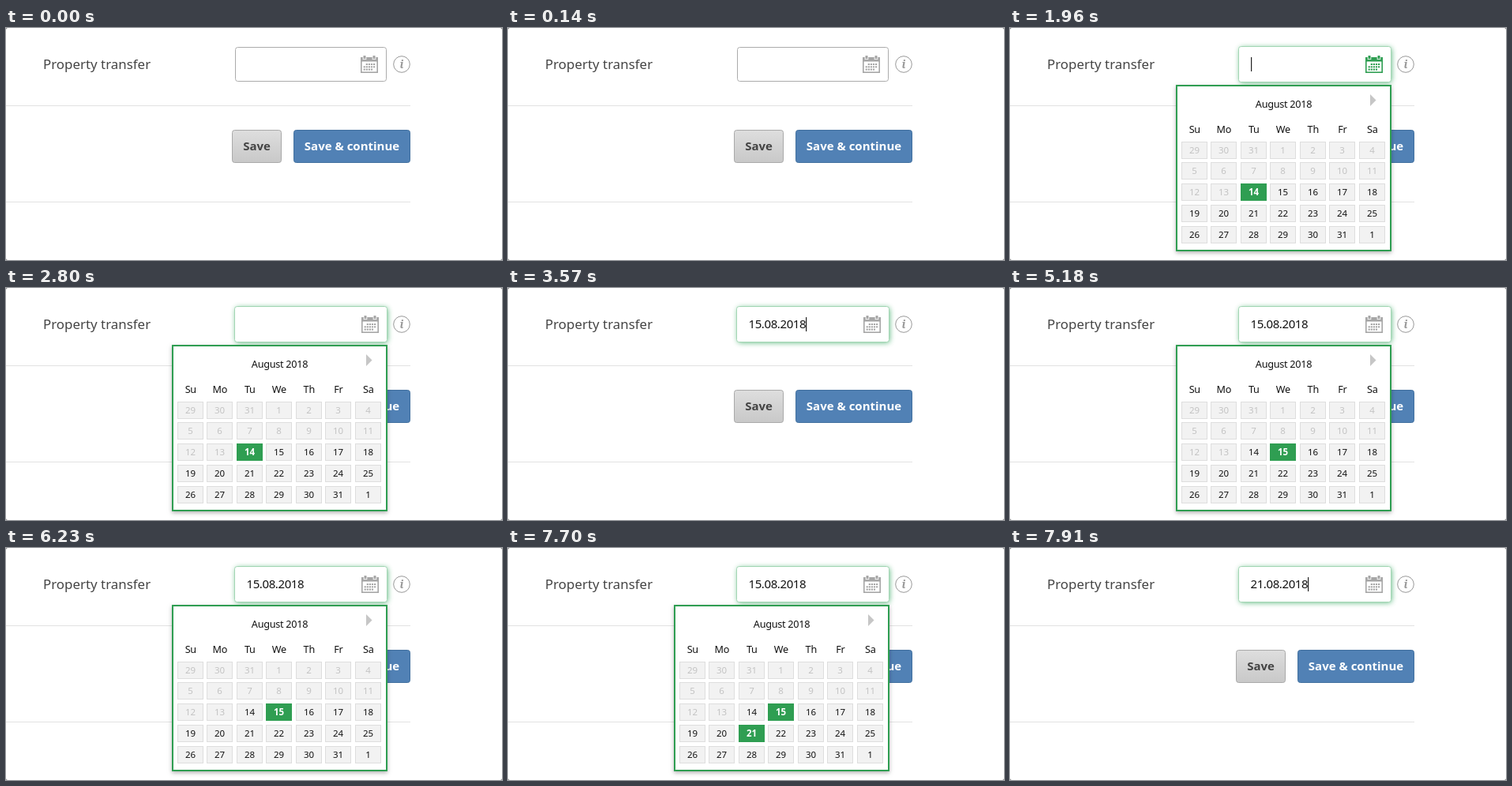
Animation of 628 by 294 pixels, one loop 8 s. Source, as an HTML page with a canvas:

```html
<!DOCTYPE html>
<html lang="en">
<head>
<meta charset="utf-8">
<title>Date picker</title>
<style>
  html, body { margin: 0; width: 100%; height: 100%; overflow: hidden; background: #fff; }
  canvas { display: block; width: 628px; height: 294px; }
</style>
</head>
<body>
<canvas id="stage"></canvas>
<script>
const W = 628, H = 294, LOOP = 8000;
const GREEN = '#2f9e52', GREY = '#a6a6a6';
const SANS = '"Noto Sans", "Open Sans", sans-serif';
const WEEKDAYS = ['Su', 'Mo', 'Tu', 'We', 'Th', 'Fr', 'Sa'];

const canvas = document.getElementById('stage');
const ctx = canvas.getContext('2d');
const ratio = window.devicePixelRatio || 1;
canvas.width = W * ratio;
canvas.height = H * ratio;

// Each track lists [start, value]; a value holds until the next start.
const tracks = {
  focus: [[0, false], [1960, true]],
  open: [[0, false], [1960, true], [3570, false], [4760, true], [7770, false]],
  date: [[0, 0], [3570, 15], [7770, 21]],
  caret: [[0, false], [1960, true], [2450, false], [3010, true], [3430, false],
    [3570, true], [4130, false], [4620, true], [5180, false], [5670, true],
    [6230, false], [6720, true], [7210, false], [7770, true]],
  iconHover: [[0, false], [1960, true], [2100, false], [4270, true], [4970, false]],
  buttonHover: [[0, false], [4130, true], [4200, false]],
  dayHover: [[0, 0], [2310, 23], [2520, 0], [2660, 22], [2800, 0], [3010, 15],
    [3570, 0], [5880, 24], [5950, 23], [6090, 0], [6370, 22], [6510, 21], [7770, 0]]
};

function valueAt(track, t) {
  let value = track[0][1];
  for (const [start, v] of track) if (t >= start) value = v;
  return value;
}

function rect(x, y, w, h, color) {
  ctx.fillStyle = color;
  ctx.fillRect(x, y, w, h);
}

function roundBox(x, y, w, h, r, fill, stroke) {
  ctx.beginPath();
  ctx.roundRect(x, y, w, h, r);
  ctx.fillStyle = fill;
  ctx.fill();
  if (stroke) {
    ctx.strokeStyle = stroke;
    ctx.lineWidth = 1;
    ctx.stroke();
  }
}

function text(str, x, y, size, color, { weight = 400, align = 'center', spacing = 0 } = {}) {
  ctx.font = `${weight} ${size}px ${SANS}`;
  ctx.letterSpacing = spacing + 'px';
  ctx.textAlign = align;
  ctx.fillStyle = color;
  ctx.fillText(str, x, y);
  ctx.letterSpacing = '0px';
}

function withShadow(color, blur, dx, dy, draw) {
  ctx.save();
  ctx.shadowColor = color;
  ctx.shadowBlur = blur * ratio;
  ctx.shadowOffsetX = dx * ratio;
  ctx.shadowOffsetY = dy * ratio;
  draw();
  ctx.restore();
}

function calendarIcon(x, y, color) {
  ctx.strokeStyle = color;
  ctx.lineWidth = 1.6;
  ctx.strokeRect(x + 0.8, y + 3, 20.4, 18.2);
  rect(x, y + 2, 22, 5.5, color);
  for (const dx of [3.5, 15.5]) {
    rect(x + dx - 0.8, y + 1, 4.6, 4, '#fff');
    rect(x + dx, y, 3, 4.2, color);
  }
  for (let row = 0; row < 3; row++) {
    for (let col = 0; col < 5; col++) {
      if ((row === 0 && col === 0) || (row === 2 && col === 4)) continue;
      rect(x + 3.6 + col * 3.1, y + 10 + row * 3.3, 2.2, 2, color);
    }
  }
}

function infoIcon() {
  ctx.beginPath();
  ctx.arc(501, 46, 10.3, 0, Math.PI * 2);
  ctx.strokeStyle = '#999';
  ctx.lineWidth = 1;
  ctx.stroke();
  ctx.font = 'italic 700 14px "Noto Serif", "Liberation Serif", serif';
  ctx.textAlign = 'center';
  ctx.fillStyle = '#999';
  ctx.fillText('i', 501, 51);
}

function button(label, x, w, top, bottom, border, color) {
  const fill = ctx.createLinearGradient(0, 129, 0, 171);
  fill.addColorStop(0, top);
  fill.addColorStop(1, bottom);
  roundBox(x + 0.5, 129.5, w - 1, 41, 3, fill, border);
  text(label, x + w / 2, 155, 15, color, { weight: 600 });
}

function field(s) {
  if (s.focus) {
    withShadow('rgba(47,165,90,0.85)', 7, 1, 1, () => roundBox(290, 24, 192, 44, 3, '#fff'));
    roundBox(289.5, 23.5, 193, 45, 3, '#fff', '#a3d6b4');
  } else {
    roundBox(290.5, 24.5, 191, 43, 3, '#fff', '#ababab');
  }
  calendarIcon(s.focus ? 450 : 449, 35, s.iconHover ? GREEN : GREY);
  if (s.date) {
    text(s.date + '.08.2018', 304.5, 51, 15, '#111', { weight: 500, align: 'left', spacing: -0.4 });
  }
  if (s.caret) rect(s.date ? 377 : 305, 37, 1.2, 18, '#222');
}

function picker(s) {
  withShadow('rgba(0,0,0,0.3)', 5, 0, 2, () => rect(210, 72, 273, 211, '#fff'));
  ctx.strokeStyle = GREEN;
  ctx.lineWidth = 2;
  ctx.strokeRect(211, 73, 271, 209);

  text('August 2018', 346.5, 101, 12.7, '#111', { weight: 500, spacing: -0.3 });
  ctx.beginPath();
  ctx.moveTo(456, 84);
  ctx.lineTo(463.5, 91.5);
  ctx.lineTo(456, 99);
  ctx.fillStyle = '#c6c6c6';
  ctx.fill();

  const selected = s.date || 14;
  for (let i = 0; i < 35; i++) {
    const col = i % 7, row = Math.floor(i / 7);
    const x = Math.floor(217 + col * 37.55), y = Math.floor(144 + row * 26.75);
    const offset = i - 2;
    const day = offset < 1 ? offset + 31 : offset > 31 ? offset - 31 : offset;
    const past = offset < 14;
    const active = offset === selected || (s.dayHover && offset === s.dayHover);
    if (row === 0) text(WEEKDAYS[col], x + 16.8, 133, 12.6, '#111', { weight: 500, spacing: -0.2 });
    rect(x, y, 33, 22, active ? GREEN : '#dedede');
    if (!active) rect(x + 1, y + 1, 31, 20, '#f2f2f2');
    text(day, x + 16.5, y + 15, 11.5, active ? '#fff' : past ? '#c3c3c3' : '#111',
      { weight: active ? 700 : 500 });
  }
}

function draw(t) {
  const s = {};
  for (const key in tracks) s[key] = valueAt(tracks[key], t);

  ctx.setTransform(ratio, 0, 0, ratio, 0, 0);
  rect(0, 0, W, H, '#777');
  roundBox(0, 0, W, H, 2.5, '#fff');
  rect(0, 98, 512, 1, '#e2e2e2');
  rect(0, 220, 512, 1, '#e2e2e2');

  text('Property transfer', 47, 52, 16.9, '#454545', { align: 'left' });
  infoIcon();
  button('Save', 286, 63, '#dedede', '#c8c8c8', '#a9a9a9', '#444');
  const blue = s.buttonHover ? '#4675a8' : '#5181b5';
  button('Save & continue', 364, 148, blue, blue, '#41709f', '#fff');
  field(s);
  if (s.open) picker(s);
}

function tick() {
  draw(performance.now() % LOOP);
  requestAnimationFrame(tick);
}
tick();
</script>
</body>
</html>
```
